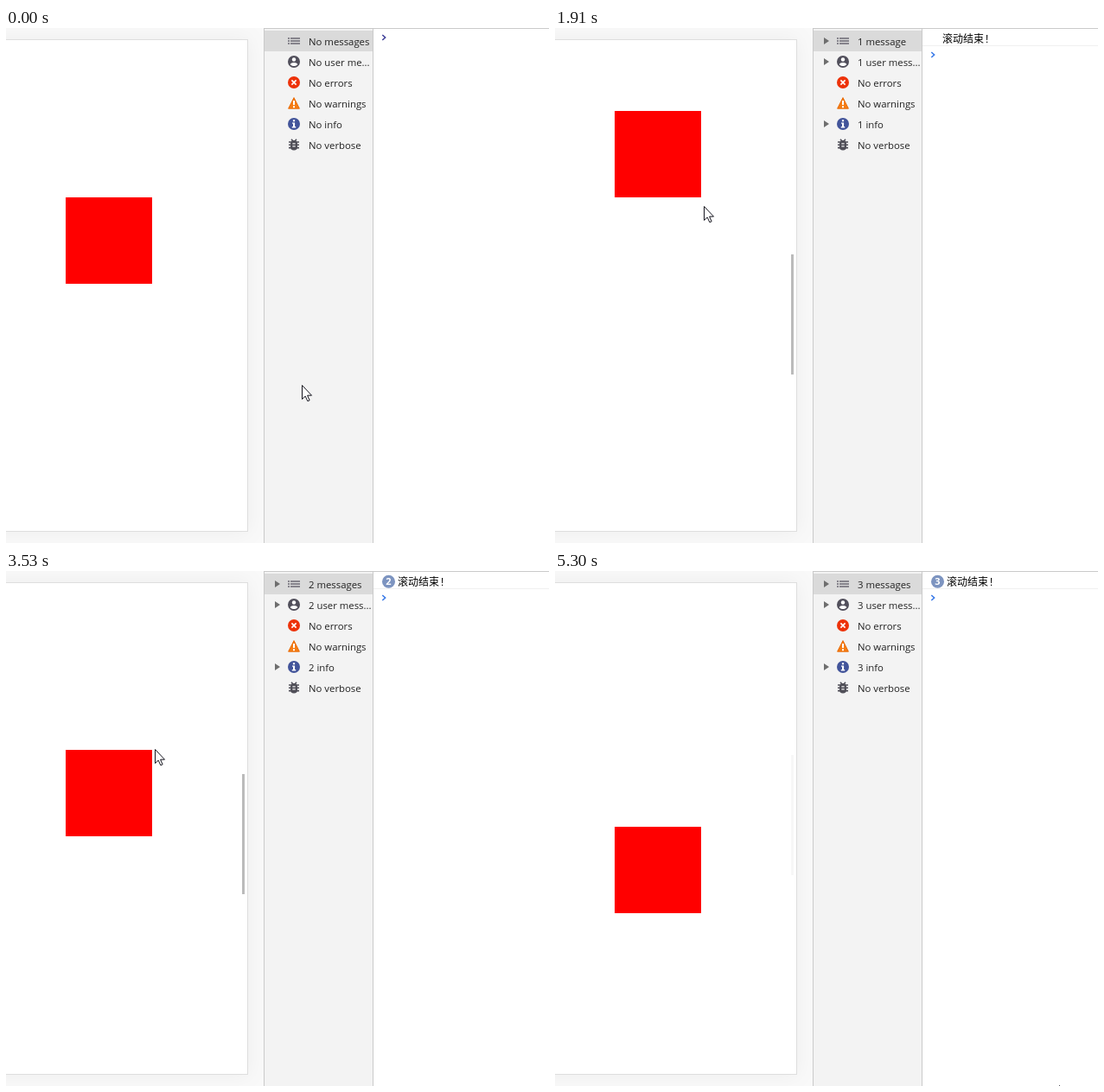
An HTML page for the animation above (5530 ms loop, 628 by 596 pixels).

```html
<!DOCTYPE html>
<html lang="en">
<head>
<meta charset="utf-8">
<title>Scroll end log</title>
<style>
  html, body { margin: 0; width: 100%; height: 100%; overflow: hidden; background: #fff; }
  svg { display: block; width: 628px; height: 596px; }
  .label { font: 11.35px "Open Sans", "Noto Sans", sans-serif; fill: #222; }
  .log { font: 12px "Liberation Mono", "Noto Sans CJK SC", "Noto Sans CJK", monospace; fill: #000; }
  .badge { font: bold 11px "Open Sans", "Noto Sans", sans-serif; fill: #fff; text-anchor: middle; }
  .page { fill: #fff; stroke: #dedede; filter: drop-shadow(0 0 12px rgba(0, 0, 0, .05)); }
</style>
</head>
<body>
<svg viewBox="0 0 628 596">
  <defs>
    <clipPath id="viewport"><rect y="14" width="279" height="568"/></clipPath>
    <clipPath id="left"><rect width="298" height="596"/></clipPath>
  </defs>

  <g clip-path="url(#left)">
    <rect width="298" height="596" fill="#f9f9f9"/>
    <rect class="page" x="-20.5" y="13.5" width="300" height="569"/>
  </g>
  <g clip-path="url(#viewport)">
    <rect id="box" x="69" width="100" height="100" fill="#f00"/>
    <rect id="thumb" x="273" width="3" height="139" fill="#bbb"/>
  </g>

  <rect x="298" width="127" height="596" fill="#f3f3f3"/>
  <rect x="299" y="3" width="125" height="24" fill="#dadada"/>
  <path d="M298.5 0V596M424.5 0V596M298 .5H628" stroke="#cacaca" fill="none"/>

  <!-- sidebar icons, each centred on its own row -->
  <g transform="translate(333 15)">
    <path d="M-7-3H7M-7 0H7M-7 3H7" stroke="#6b6873" stroke-width="1.7" stroke-dasharray="2 1 11"/>
  </g>
  <g transform="translate(333 39)">
    <circle r="7" fill="#514f5b"/>
    <circle cy="-2.5" r="2.2" fill="#fff"/>
    <path d="M-4.3 3C-3.5 .3 3.5 .3 4.3 3C2.5 5.7-2.5 5.7-4.3 3Z" fill="#fff"/>
  </g>
  <g transform="translate(333 63)">
    <circle r="7" fill="#ed3209"/>
    <path d="M-2.6-2.6L2.6 2.6M2.6-2.6L-2.6 2.6" stroke="#fff" stroke-width="1.6"/>
  </g>
  <g transform="translate(333 87)">
    <path d="M0-6.4L6.4 6.2H-6.4Z" fill="#f57c13" stroke="#e96d0c" stroke-linejoin="round"/>
    <path d="M0-3V2M0 3.3V5.2" stroke="#fff" stroke-width="2"/>
  </g>
  <g transform="translate(333 111)">
    <circle r="7" fill="#42549a"/>
    <path d="M-1.1-4.7H1.1V-2.7H-1.1ZM-2-1.5H1.1V3H2.2V4.4H-2.2V3H-1V-.2H-2Z" fill="#fff"/>
  </g>
  <g transform="translate(333 135)">
    <path d="M-6-3H6M-6 .3H6M-6 3.6H6M-3-6.2L-1-4M3-6.2L1-4" stroke="#504f58" stroke-width="1.6"/>
    <rect x="-4" y="-5" width="8" height="11.5" rx="3.8" fill="#504f58"/>
    <path d="M-1.6-1.2H1.6M-1.6 1.8H1.6" stroke="#f3f3f3" stroke-width="1.3"/>
  </g>
  <path id="arrows" fill="#6e6e6e" d="M311 11l6 4l-6 4zM311 35l6 4l-6 4zM311 107l6 4l-6 4z"/>
  <g id="labels" class="label"></g>

  <g id="entry">
    <path d="M425 20.5H628" stroke="#f0f0f0"/>
    <g id="badge">
      <circle cx="442.5" cy="12.3" r="7.5" fill="#7d94c0"/>
      <text id="repeat" class="badge" x="442.5" y="16.3"></text>
    </g>
    <text id="message" class="log" y="16.5">滚动结束!</text>
  </g>
  <path id="prompt" d="M435.3 8L438.6 11L435.3 14" fill="none" stroke-width="1.6"/>

  <path id="cursor" d="M.5 .5V16.6L4.2 13.1L6.9 18.9L9.1 17.9L6.6 12.2H11.5Z" fill="#fff" stroke="#15151f" stroke-linejoin="round"/>
</svg>

<script>
const LOOP = 5530;
const FRAME = LOOP / 72;
const LEAD = 12;          // each sample appears slightly early

const scrollStart = 196;
const scrolls = [
  { from: 154, to: 410, y: -204 },
  { from: 410, to: 720, y: 296 },
  { from: 1600, to: 1920, y: 96 },
  { from: 2535, to: 2765, y: 188 },
  { from: 2765, to: 2995, y: 33 },
  { from: 2995, to: 3302, y: 360 },
  { from: 3302, to: 3533, y: 207 },
  { from: 3533, to: 3686, y: 296 },
  { from: 3840, to: 4070, y: 204 },
  { from: 4070, to: 4224, y: 296 }
];
const cursorStart = { x: 342, y: 413 };
const cursorMoves = [
  { from: 0, to: 230, x: 172, y: 206 },
  { from: 4531, to: 4762, x: 222, y: 240 },
  { from: 4916, to: 5299, x: 583, y: 595 }
];
const logTimes = [1225, 2455, 4530];

const $ = id => document.getElementById(id);
const show = (id, visible) => $(id).setAttribute("visibility", visible ? "inherit" : "hidden");

// Follows a chain of moves, each with a sine ease in and out.
function follow(moves, axis, start, t) {
  return moves.reduce((value, move) => {
    const p = Math.min(1, Math.max(0, (t - move.from) / (move.to - move.from)));
    return value + (move[axis] - value) * (1 - Math.cos(Math.PI * p)) / 2;
  }, start);
}

const labels = Array.from({ length: 6 }, (_, row) => {
  const text = document.createElementNS("http://www.w3.org/2000/svg", "text");
  text.setAttribute("x", 350);
  text.setAttribute("y", 20 + row * 24);
  return $("labels").appendChild(text);
});

function showLogs(count) {
  const n = count || "No";
  const names = [
    `${n} message${count === 1 ? "" : "s"}`,
    count ? `${n} user mess...` : "No user me...",
    "No errors", "No warnings", `${n} info`, "No verbose"
  ];
  labels.forEach((label, i) => label.textContent = names[i]);
  show("arrows", count > 0);
  show("entry", count > 0);
  show("badge", count > 1);
  $("repeat").textContent = count;
  $("message").setAttribute("x", count > 1 ? 453 : 448);
  $("prompt").setAttribute("transform", `translate(0 ${count ? 20 : 0})`);
  $("prompt").setAttribute("stroke", count ? "#3b7be8" : "#42429a");
}

// The bar shows from the first scroll until the end is logged, then leaves a trace.
function thumbOpacity(t, lastLog) {
  const lastScroll = scrolls.findLast(s => s.from < t);
  if (!lastScroll) return 0;
  return lastScroll.from > lastLog ? 1 : .12;
}

let shownCount = -1;
function render(time) {
  const t = Math.floor((time + LEAD) / FRAME) * FRAME;
  const y = Math.round(follow(scrolls, "y", scrollStart, t));
  const x = axis => Math.round(follow(cursorMoves, axis, cursorStart[axis], t));
  const count = logTimes.filter(log => log <= t).length;

  $("box").setAttribute("y", y);
  $("thumb").setAttribute("y", Math.round(213 + (296 - y) * .247));
  $("thumb").setAttribute("opacity", thumbOpacity(t, logTimes[count - 1] ?? 0));
  $("cursor").setAttribute("transform", `translate(${x("x")} ${x("y")})`);
  if (count !== shownCount) showLogs(shownCount = count);
}

const start = performance.now();
function tick() {
  render((performance.now() - start) % LOOP);
  requestAnimationFrame(tick);
}
tick();
</script>
</body>
</html>
```
